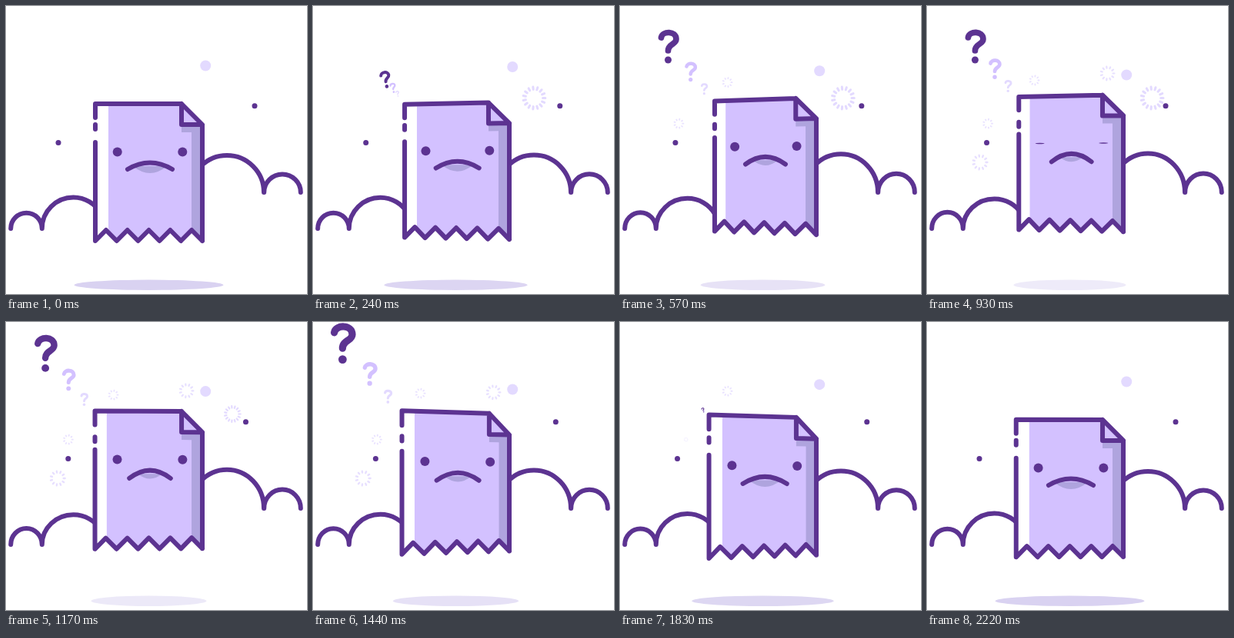
An HTML page with a canvas that plays this animation: 391x374 px, repeating every 2.25 s.

```html
<!DOCTYPE html>
<html lang="en">
<head>
<meta charset="utf-8">
<title>Sad page</title>
<style>
  html, body { margin: 0; width: 100%; height: 100%; overflow: hidden; background: #fff; }
  canvas { display: block; width: 391px; height: 374px; }
</style>
</head>
<body>
<canvas id="stage"></canvas>
<script>
const W = 391, H = 374, LOOP = 2250, PI = Math.PI, LINE = 6;
const INK = '#5c3391', LILAC = '#d3c1ff', SHADE = '#afa4de', PALE = '#e3daff';
const canvas = document.getElementById('stage');
const ctx = canvas.getContext('2d');
const dpr = window.devicePixelRatio || 1;
canvas.width = Math.round(W * dpr);
canvas.height = Math.round(H * dpr);

const rad = deg => deg * PI / 180;
const clamp = v => Math.max(0, Math.min(1, v));
const mix = (a, b, k) => a + (b - a) * k;
const ramp = (from, to, t) => clamp((t - from) / (to - from));

// One swing 0..1..0 per loop; a positive lead (degrees) peaks early, a negative one late
function swell(t, lead) {
  const a = t / LOOP * 2 * PI;
  return (1 - Math.cos(a + rad(lead) * Math.sin(a / 2))) / 2;
}

function turn(t) {
  const a = t / LOOP * 2 * PI;
  return rad(13.2 * Math.sin(a) - Math.sin(2 * a));
}

// x, y is the place at 930 ms; vx, vy the direction of drift
const RINGS = [
  { x: 292.5, y: 119.5, vx: 1, vy: 0, r: 16, from: 60, to: 1350 },
  { x: 139.5, y: 96.5, vx: 0, vy: -1, r: 7, from: 340, to: 2080 },
  { x: 79, y: 152.7, vx: 1, vy: 0, r: 7, from: 360, to: 1930 },
  { x: 69, y: 203, vx: -1, vy: 0, r: 10.7, from: 650, to: 1820 },
  { x: 234.5, y: 87.5, vx: 0, vy: 1, r: 10, from: 650, to: 1780 }
];

// Resting places, largest first
const MARKS = [
  { x: 63, y: 52, color: INK },
  { x: 92, y: 85, color: LILAC },
  { x: 109.5, y: 107.5, color: PALE }
];
const HOME = { x: 110, y: 117 };

function disc(x, y, rx, ry, color) {
  ctx.beginPath();
  ctx.ellipse(x, y, rx, ry, 0, 0, PI * 2);
  ctx.fillStyle = color;
  ctx.fill();
}

function stroke(color, width) {
  ctx.strokeStyle = color;
  ctx.lineWidth = width;
  ctx.stroke();
}

function drawRing({ x, y, vx, vy, r, from, to }, t) {
  const k = ramp(from, from + 150, t) * ramp(to, to - 250, t);
  if (k <= 0) return;
  const shift = (t - 930) * .0075, size = r * k, w = (r * .14 + .8) * k;
  const rays = Math.round(5 + r * .6);
  ctx.save();
  ctx.globalAlpha = .6 + r / 40;
  ctx.translate(x + vx * shift, y + vy * shift);
  ctx.beginPath();
  for (let i = 0; i < rays; i++) {
    const a = i / rays * 2 * PI, c = Math.cos(a), s = Math.sin(a);
    ctx.moveTo(c * size * .7, s * size * .7);
    ctx.lineTo(c * (size - w / 2), s * (size - w / 2));
  }
  stroke(PALE, w);
  ctx.restore();
}

function drawMark({ x, y, color }, i, t) {
  const k = ramp(110, 500, t) * ramp(1840, 1540, t);
  if (k <= 0) return;
  const drift = ramp(930 - 130 * i, 1440, t);
  const size = .585 ** i * (1 + .2 * drift) * k ** .6;
  ctx.save();
  ctx.translate(mix(HOME.x, x - (24 - 6 * i) * drift, k), mix(HOME.y, y - (25 - 7 * i) * drift, k));
  ctx.rotate(rad(-18 * (1 - k)));
  ctx.scale(size, size);
  ctx.beginPath();
  ctx.moveTo(-9.5, -11);
  ctx.bezierCurveTo(-8, -20, 10, -20, 10, -9);
  ctx.bezierCurveTo(10, -2, -.5, -3, -.5, 6);
  stroke(color, 7.7);
  disc(-.5, 18, 4.5, 4.5, color);
  ctx.restore();
}

function drawClouds(m) {
  const bump = (x, y, rx, ry, end = 0) => ctx.ellipse(x, y, rx, ry, 0, PI, end);
  ctx.beginPath();
  bump(26.5, 289, 20.3, 20.2 + m);
  bump(87.5, 289, 40.7, 40.5 - 2 * m, -.5);
  ctx.moveTo(239, 242);
  bump(287, 242, 48, 48 + 2.5 * m);
  bump(359, 242, 23.8, 23.5 + m);
  stroke(INK, LINE);
}

const zigzag = Array.from({ length: 11 }, (_, i) => [116 + 13.9 * i, i % 2 ? 291 : 305]);
const OUTLINE = [[116, 127], [228, 127], [255, 154], ...zigzag.slice().reverse()];

function drawPage(t, m, lift) {
  const angle = turn(t), sin = Math.sin(angle), cos = Math.cos(angle);
  // Turn about the right edge, seen in perspective
  const at = (x, y) => {
    const u = 255 - x, s = 600 / (600 + u * sin);
    return [185 - (u * cos - 70) * s, 216 + (y - 216) * s - lift];
  };
  const trace = pts => pts.forEach((p, i) => ctx[i ? 'lineTo' : 'moveTo'](...at(...p)));
  const fill = (pts, color) => {
    ctx.beginPath();
    trace(pts);
    ctx.fillStyle = color;
    ctx.fill();
  };
  // Symmetric arc around the middle of the face
  const arch = (half, y, bend) => {
    ctx.beginPath();
    ctx.moveTo(...at(187 - half, y));
    ctx.quadraticCurveTo(...at(187, y + bend), ...at(187 + half, y));
  };

  fill(OUTLINE, '#fff');
  ctx.save();
  ctx.beginPath();
  trace(OUTLINE);
  ctx.clip();
  const left = 133 - 2 * m;
  fill([[left, 120], [260, 120], [260, 310], [left, 310]], LILAC);
  fill([[228, 154], [260, 154], [260, 310], [241, 310], [241, 164], [228, 164]], SHADE);
  ctx.restore();

  const fold = [[228, 127], [255, 154], [228, 154], [228, 127]];
  const dash = 154 + 7 * m;
  fill(fold, LILAC);
  ctx.beginPath();
  trace([[116, 145], [116, 127], [228, 127], [255, 154], [255, 305]]);
  trace(fold);
  trace([[116, dash], [116, dash + 6]]);
  trace([[116, 177], ...zigzag]);
  stroke(INK, LINE);

  const open = Math.max(.12, clamp(Math.abs(t - 930) / 110));
  for (const x of [144.7, 229.3]) disc(...at(x, 189.6), 6, 6 * open, INK);

  arch(mix(22, 15, m), 208, mix(18, 12, m));
  ctx.fillStyle = SHADE;
  ctx.fill();
  const drop = mix(8.5, 10.5, m);
  arch(mix(29, 26.5, m), 203.5 + drop, -2 * drop);
  stroke(INK, LINE);
}

function draw(t) {
  const m = swell(t, 26), lift = 11.8 * m;
  ctx.setTransform(dpr, 0, 0, dpr, 0, 0);
  ctx.fillStyle = '#fff';
  ctx.fillRect(0, 0, W, H);
  ctx.lineCap = ctx.lineJoin = 'round';

  ctx.globalAlpha = 1 - .55 * m;
  disc(185.5, 362.3, 97 - 24 * m, 6.7, '#d9d2f1');
  ctx.globalAlpha = 1;

  drawClouds(m);
  RINGS.forEach(ring => drawRing(ring, t));
  disc(259.2, 77.5 + 12.7 * swell(t, 4), 7, 7, PALE);
  disc(68 + 13.7 * swell(t, -37), 177.5, 3.5, 3.5, INK);
  disc(323 - 13 * swell(t, 32), 129.8, 3.5, 3.5, INK);
  for (let i = MARKS.length - 1; i >= 0; i--) drawMark(MARKS[i], i, t);
  drawPage(t, m, lift);
}

const start = performance.now();
function tick() {
  draw((performance.now() - start) % LOOP);
  requestAnimationFrame(tick);
}
tick();
</script>
</body>
</html>
```
